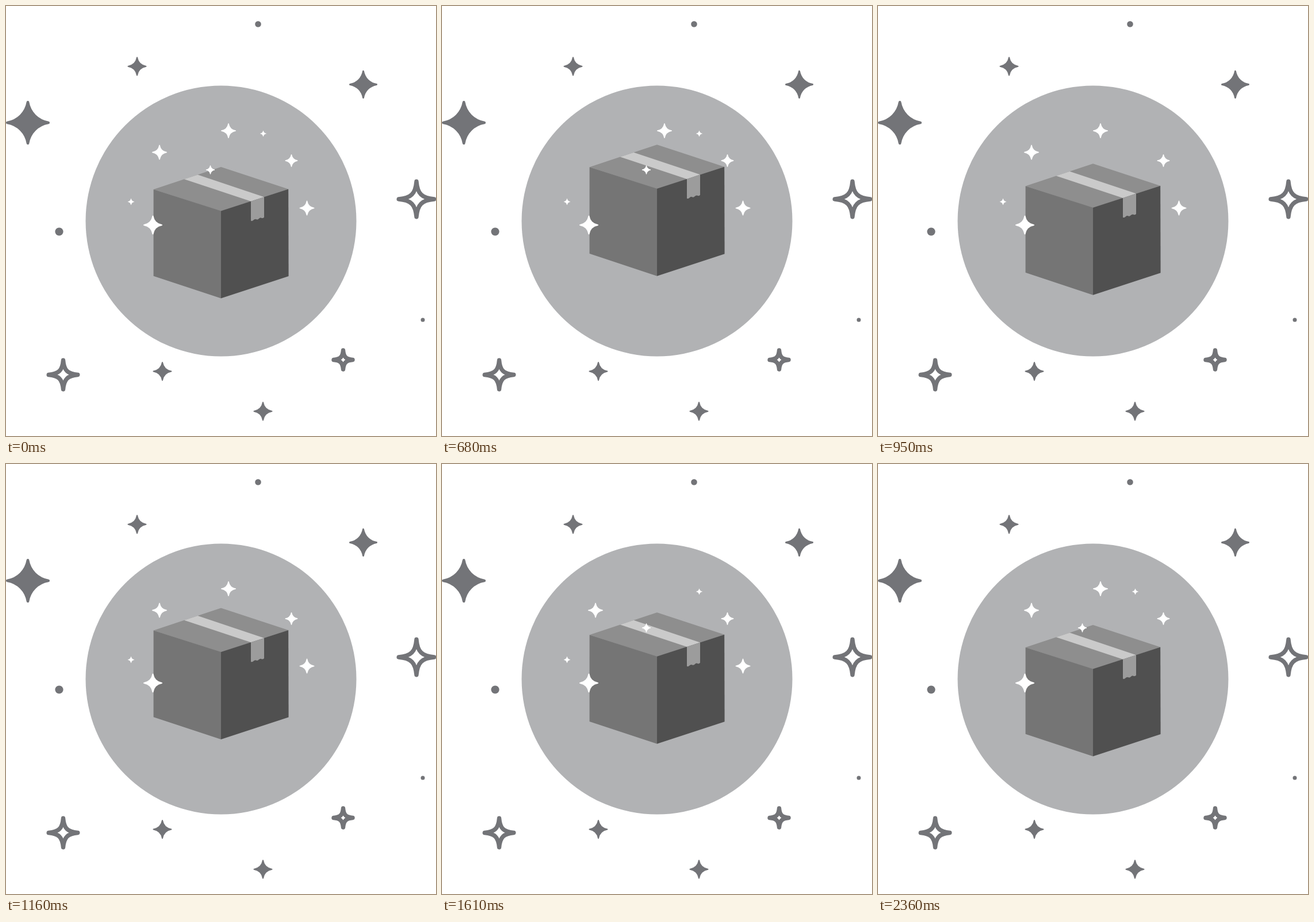
Animation of 748 by 748 pixels, one loop 2860 ms. Source, as an HTML page:

```html
<!DOCTYPE html>
<html lang="en">
<head>
<meta charset="utf-8">
<title>Bouncing parcel</title>
<style>
  html, body { margin: 0; width: 100%; height: 100%; overflow: hidden; background: #fff; }
  svg { display: block; width: 100%; height: 100%; }
</style>
</head>
<body>
<svg viewBox="0 0 748 748">
  <circle cx="374" cy="374" r="235.5" fill="#b1b2b4"/>
  <g id="decor" fill="#737478"></g>
  <g id="box">
    <path d="M374 280L491.2 318.5L374 357L256.6 319Z" fill="#8e8e8e"/>
    <path d="M256.6 319L374 356.5V508.5L256.6 469.7Z" fill="#757575"/>
    <path d="M374 356.5L491.2 318.5L491.6 470L374 508.5Z" fill="#505050"/>
    <path d="M310 301.3L333.5 293.5L449 332.2L426 339.8Z" fill="#cacaca"/>
    <path d="M426 339.8L449 332.2V367.5q-2.3 2.4 -4.6 1.2t-4.6 1.2t-4.6 1.2t-4.6 1.2t-4.6 1.2Z" fill="#9c9c9c"/>
  </g>
  <g id="sparks" fill="#fff"></g>
</svg>
<script>
const NS = 'http://www.w3.org/2000/svg';
const LOOP = 2860, HOLD = 500, MOVE_END = 1860, STEP = 30;
const GRAY = '#737478';
const [decor, box, sparks] = ['decor', 'box', 'sparks'].map(id => document.getElementById(id));

function add(parent, tag, attrs) {
  const el = document.createElementNS(NS, tag);
  for (const key in attrs) el.setAttribute(key, attrs[key]);
  parent.appendChild(el);
  return el;
}

// Four concave sides between the tips; a larger bulge gives a fuller body.
function starPath(x, y, r, bulge) {
  const near = bulge / 5;
  let d = `M${x} ${y - r}`;
  for (let k = 0; k < 4; k++) {
    const c = Math.cos(k * Math.PI / 2), s = Math.sin(k * Math.PI / 2);
    const at = (a, b) => `${(x + r * (a * c - b * s)).toFixed(2)} ${(y + r * (a * s + b * c)).toFixed(2)}`;
    d += `C${at(near, -bulge)} ${at(bulge, -near)} ${at(1, 0)}`;
  }
  return d + 'Z';
}

// The stroke rounds the tips, so the path is shortened by half of it.
function star(parent, x, y, r, color, fill = color, width = r * .12, bulge = .475) {
  return add(parent, 'path', {
    d: starPath(x, y, r - width / 2, bulge),
    fill, stroke: color, 'stroke-width': width, 'stroke-linejoin': 'round'
  });
}

const solid = (x, y, r = 16.5) => star(decor, x, y, r, GRAY);
const ring = (x, y, r) => star(decor, x, y, r, GRAY, '#fff', 7.4, .3);
const dot = (cx, cy, r) => add(decor, 'circle', { cx, cy, r });

solid(228, 105);
solid(272, 635.5);
solid(447, 705);
solid(621.5, 136.5, 24.5);
solid(38, 203, 38);
ring(714, 336, 34.5);
ring(99.5, 641.5, 29);
ring(586.5, 615.5, 20.2);
dot(438.5, 31.5, 5.3);
dot(92.5, 392.5, 7.1);
dot(725, 546, 3.5);

const spark = (x, y, r = 13) => star(sparks, x, y, r, '#fff');
spark(496.5, 269, 11);
spark(255.5, 381, 16.5);
const left = [spark(267, 254.5)];
const top_ = [spark(387, 217)];
const small = [spark(447.5, 222, 5.3), spark(355.5, 285, 8)];
const sides = [spark(217.5, 340.5, 5.7), spark(523.5, 351.5)];

// Sparkles hidden in each scene, in playing order.
const scenes = [[], left, small, top_, small, sides];

function sceneAt(t) {
  if (t < HOLD) return 0;
  if (t < MOVE_END) return Math.min(3, 1 + Math.floor((t - HOLD) / (15 * STEP)));
  return 4 + Math.floor((t - MOVE_END) / HOLD);
}

// Each hop lasts DECAY times the one before; height follows duration squared.
const HOPS = 3, FIRST = 473, HEIGHT = 42, DECAY = .87, SINK = 2;

function boxY(t) {
  let s = Math.floor((t - HOLD) / STEP) * STEP;
  if (s < 0) return 0;
  const floorAt = k => k > 0 && k < HOPS ? SINK : 0;
  for (let k = 0; k < HOPS; k++) {
    const span = FIRST * DECAY ** k, p = s / span;
    if (p < 1) {
      const ground = floorAt(k) + (floorAt(k + 1) - floorAt(k)) * p;
      return ground - 4 * HEIGHT * DECAY ** (2 * k) * p * (1 - p);
    }
    s -= span;
  }
  return 0;
}

function draw(t) {
  box.setAttribute('transform', `translate(0 ${boxY(t).toFixed(2)})`);
  const hidden = scenes[sceneAt(t)];
  for (const el of sparks.children)
    el.setAttribute('visibility', hidden.includes(el) ? 'hidden' : 'visible');
}

const begin = performance.now();
function tick() {
  draw((performance.now() - begin) % LOOP);
  requestAnimationFrame(tick);
}
tick();
</script>
</body>
</html>
```
